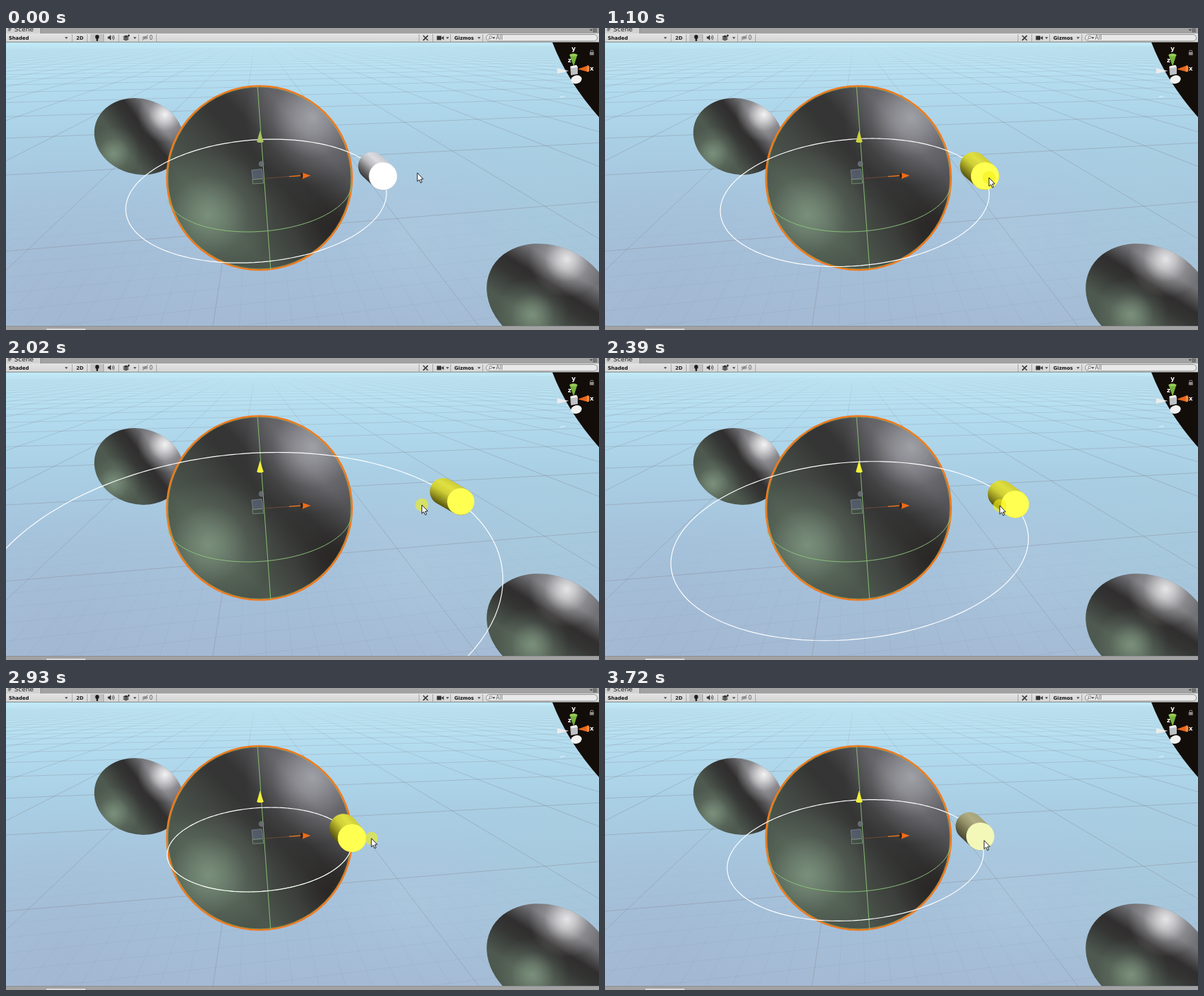
Write an HTML page with a canvas that moves like this. It is 865x440 px and loops after 4.29 s.

```html
<!DOCTYPE html>
<html lang="en">
<head>
<meta charset="utf-8">
<title>Scene view radius handle</title>
<style>
html, body { margin: 0; width: 865px; height: 440px; overflow: hidden; background: #a2a2a2; }
canvas { display: block; }
</style>
</head>
<body>
<canvas id="stage" width="865" height="440"></canvas>
<script>
const W = 865, H = 440, LOOP = 4290, TAU = Math.PI * 2;
const stage = document.getElementById('stage').getContext('2d');
const backdrop = makeLayer(), overlay = makeLayer();
let g = stage;

function makeLayer() {
  const c = document.createElement('canvas');
  c.width = W;
  c.height = H;
  return c.getContext('2d');
}

// Perspective of the ground plane; one unit is the big sphere's radius.
const YAW = 0.14, COS = Math.cos(YAW), SIN = Math.sin(YAW);
const depth = z => 1 + 0.2703 * z;
const project = (x, z) => [432 + (128.4 * x - 58) / depth(z), 8 + 210.9 / depth(z)];
const rotate = (a, b) => [a * COS - b * SIN, a * SIN + b * COS];

function path(points, close) {
  g.beginPath();
  points.forEach(p => g.lineTo(p[0], p[1]));
  if (close) g.closePath();
}
function poly(points, fill, line, width = 1) {
  path(points, true);
  if (fill) { g.fillStyle = fill; g.fill(); }
  if (line) { g.strokeStyle = line; g.lineWidth = width; g.stroke(); }
}
function stroke(points, color, width = 1) {
  path(points);
  g.strokeStyle = color;
  g.lineWidth = width;
  g.stroke();
}
function box(x, y, w, h, color) {
  g.fillStyle = color;
  g.fillRect(x, y, w, h);
}
function oval(x, y, rx, ry, fill, angle = 0) {
  g.beginPath();
  g.ellipse(x, y, rx, ry, angle, 0, TAU);
  g.fillStyle = fill;
  g.fill();
}
function text(s, x, y, font, color) {
  g.font = font;
  g.fillStyle = color;
  g.fillText(s, x, y);
}
function linear(x0, y0, x1, y1, stops) {
  const gr = g.createLinearGradient(x0, y0, x1, y1);
  stops.forEach(([at, c]) => gr.addColorStop(at, c));
  return gr;
}
function glow(x, y, r, rgb, alpha) {
  const gr = g.createRadialGradient(x, y, 0, x, y, r);
  [[0, 1], [0.25, 0.72], [0.6, 0.22], [1, 0]].forEach(([at, k]) =>
    gr.addColorStop(at, `rgba(${rgb},${alpha * k})`));
  box(x - r, y - r, 2 * r, 2 * r, gr);
}

function arc(r, from, to) {
  const pts = [], n = 160;
  for (let i = 0; i <= n; i++) {
    const a = from + (to - from) * i / n;
    pts.push(project(r * Math.cos(a), r * Math.sin(a)));
  }
  return pts;
}

function gridLine(at, alongX, color) {
  const pts = [];
  for (let s = -45; s <= 45; s += 0.25) {
    const [x, z] = alongX ? rotate(s, at) : rotate(at, s);
    if (depth(z) > 0.3) pts.push(project(x, z));
  }
  if (pts.length > 1) stroke(pts, color, 1);
}

function drawGrid() {
  const step = 1.48;
  const major = linear(0, 21, 0, 434, [
    [0, 'rgba(120,125,140,0)'], [0.12, 'rgba(120,125,140,.2)'],
    [0.35, 'rgba(128,124,132,.36)'], [1, 'rgba(130,124,130,.34)']]);
  const minor = linear(0, 21, 0, 434, [
    [0, 'rgba(100,115,140,0)'], [0.45, 'rgba(100,115,140,0)'], [1, 'rgba(100,115,140,.11)']]);
  for (let i = -24; i <= 24; i++) {
    gridLine(1.17 + i * step, false, major);
    gridLine(-0.978 + i * step, true, major);
  }
  for (let i = -40; i <= 40; i++) {
    if (i % 10 === 0) continue;
    gridLine(1.17 + i * step / 10, false, minor);
    gridLine(-0.978 + i * step / 10, true, minor);
  }
}

function drawSky() {
  box(0, 21, W, 413, linear(0, 21, 0, 434, [
    [0, '#c0e8f5'], [0.15, '#b3dcef'], [0.35, '#a9cfe5'], [0.6, '#a6c3dc'], [1, '#a4bad4']]));
  glow(800, 270, 260, '168,208,222', 0.5);
  glow(590, 300, 170, '178,206,226', 0.35);
  glow(90, 400, 220, '160,180,208', 0.4);
}

// Ball lit white from the upper right and green from the lower left.
function ball(x, y, rx, ry, angle, white, green, stops, shine) {
  g.save();
  g.beginPath();
  g.ellipse(x, y, rx, ry, angle, 0, TAU);
  g.clip();
  const dx = white[0] - green[0], dy = white[1] - green[1];
  const len = Math.hypot(dx, dy), ux = dx / len * ry, uy = dy / len * ry;
  box(x - rx, y - rx, 2 * rx, 2 * rx, linear(x - ux, y - uy, x + ux, y + uy, stops));
  glow(green[0], green[1], ry * 0.72, '146,174,148', 0.66);
  glow(white[0], white[1], ry * 0.74, shine ? '250,250,252' : '205,205,214', shine || 0.62);
  g.restore();
}

function drawWorld() {
  drawSky();
  drawGrid();
  g.beginPath();
  g.moveTo(797, 21);
  g.quadraticCurveTo(819, 78, 865, 130);
  g.lineTo(865, 21);
  g.fillStyle = '#130d09';
  g.fill();

  const small = [[0, '#4c574d'], [0.25, '#4e594f'], [0.5, '#343534'],
    [0.62, '#302e2e'], [0.82, '#727276'], [1, '#6c6c72']];
  ball(194, 158, 66, 55, 0.28, [232, 126], [157, 183], small, 0.95);
  ball(793, 393, 95, 75, 0.43, [818, 337], [768, 417], small, 0.85);
  ball(370, 218.5, 135, 134, 0, [447, 130], [295, 273], [
    [0, '#465047'], [0.2, '#4c574d'], [0.42, '#414541'], [0.56, '#343534'],
    [0.66, '#353535'], [0.85, '#57575b'], [1, '#545459']]);
  g.save();
  g.beginPath();
  g.arc(370, 218.5, 134, 0, TAU);
  g.clip();
  glow(490, 300, 110, '32,26,24', 0.6);
  g.restore();

  g.lineWidth = 2.6;
  g.strokeStyle = '#f07a1e';
  g.beginPath();
  g.ellipse(369.7, 218.5, 135, 134, 0, 0, TAU);
  g.stroke();
  g.lineWidth = 0.8;
  g.strokeStyle = 'rgba(160,190,90,.6)';
  g.beginPath();
  g.ellipse(369.7, 218.5, 133.4, 132.4, 0, 0, TAU);
  g.stroke();
  stroke(arc(1, -2.646, -0.19), '#8cc47c');
  stroke([[367, 86], [376.5, 219], [386, 352]], '#86c070');
}

function triangle(x, y) {
  poly([[x - 2.2, y - 1.2], [x + 2.2, y - 1.2], [x, y + 1.6]], '#444');
}

function drawBars() {
  const bold = 'bold 7px "DejaVu Sans", sans-serif';
  box(0, 0, W, 8, '#a2a2a2');
  box(0, 0, 50, 8, '#d2d2d2');
  stroke([[50.5, 0], [50.5, 8]], '#8a8a8a');
  text('#', 2, 5, '8px "DejaVu Sans", sans-serif', '#444');
  text('Scene', 12, 5, '9.3px "DejaVu Sans", sans-serif', '#222');
  triangle(853.5, 3);
  for (const y of [1, 3, 5]) box(856, y, 6, 1, '#444');

  box(0, 8, W, 13, linear(0, 8, 0, 21, [[0, '#e4e4e4'], [1, '#d3d3d3']]));
  box(0, 20, W, 1, '#8c8c8c');
  for (const x of [96, 118, 142, 164, 193, 219, 602, 622, 648, 695]) box(x, 9, 1, 11, '#a6a6a6');
  box(123, 9, 19, 11, '#c4c4c4');
  text('Shaded', 4, 17, bold, '#111');
  text('2D', 102.5, 17, bold, '#222');
  text('Gizmos', 654, 17, bold, '#111');
  [88, 188, 644, 690].forEach(x => triangle(x, 14.5));

  oval(133, 13, 2.8, 3, '#1c1c1c');
  box(131.8, 15, 2.4, 4, '#1c1c1c');
  poly([[148.5, 12.5], [150.5, 12.5], [153, 10], [153, 18], [150.5, 15.5], [148.5, 15.5]], '#333');
  for (const r of [3, 5.2]) {
    g.beginPath();
    g.arc(152.5, 14, r, -0.8, 0.8);
    g.strokeStyle = '#444';
    g.stroke();
  }
  for (const y of [16.5, 14.5, 12.5])
    poly([[170, y], [175, y - 2.2], [180, y], [175, y + 2.2]], '#333', '#ddd', 0.5);
  oval(179, 11, 1.4, 1.4, '#333');
  oval(203, 14, 4, 2.3, '#9a9a9a');
  stroke([[199, 18], [207, 10]], '#777');
  text('0', 209, 17, '8px "DejaVu Sans", sans-serif', '#555');

  stroke([[608.5, 18], [615.5, 11]], '#222', 1.7);
  stroke([[608.5, 11], [615.5, 18]], '#444', 1.7);
  box(628.5, 11.5, 6.5, 6, '#333');
  poly([[635, 14.5], [638.5, 11.5], [638.5, 17.5]], '#333');

  g.beginPath();
  g.roundRect(700.5, 9.5, 162, 9.5, 5);
  g.fillStyle = '#e9e9e9';
  g.fill();
  g.strokeStyle = '#8d8d8d';
  g.lineWidth = 1;
  g.stroke();
  g.beginPath();
  g.arc(707, 13.5, 2, 0, TAU);
  g.stroke();
  stroke([[705.5, 15], [703.8, 17]], '#666');
  triangle(711.5, 14.5);
  text('All', 714.5, 17, '8px "DejaVu Sans", sans-serif', '#666');

  box(0, 434, W, 6, '#a2a2a2');
  box(0, 434, W, 1, '#8b8f94');
  box(59, 438, 57, 2, '#dadada');
}

function drawCompass() {
  const bold = 'bold 9px "DejaVu Sans", sans-serif';
  poly([[804, 58.5], [804, 66.5], [821, 62.5]], '#ececec');
  poly([[822, 39], [833.5, 39], [828, 56]], '#77b33c');
  oval(827.8, 39.3, 5.8, 2, '#96cc58');
  poly([[849, 54.5], [849, 64], [834, 60]], '#e8661c');
  oval(849, 59.3, 2, 4.8, '#f58a3c');
  poly([[823, 56], [832, 54], [834, 57], [834, 67], [824, 69]], '#bfc2c5');
  poly([[823, 56], [832, 54], [834, 57], [825, 58.5]], '#f2f2f2');
  oval(832, 75, 8, 6, '#f1f1f1', -0.25);
  text('y', 825, 33, bold, '#fff');
  text('x', 851.5, 62, bold, '#fff');
  text('z', 819.5, 50, bold, '#fff');
  box(851.5, 35, 6, 4.5, '#8a8a8a');
  g.beginPath();
  g.arc(854.5, 34.5, 2, Math.PI, TAU);
  g.strokeStyle = '#8a8a8a';
  g.lineWidth = 1.2;
  g.stroke();
  stroke([[808, 100.5], [815, 99.5]], 'rgba(255,255,255,.7)');
}

function drawMover(tip) {
  poly([[358.5, 207], [373, 205.5], [375, 219.5], [360, 221]], 'rgba(100,112,135,.6)', '#7d8792', 0.8);
  poly([[359.5, 220.5], [374.5, 219.5], [376, 226], [360, 227]], 'rgba(75,95,80,.4)', '#7f967c', 0.8);
  oval(372.5, 198, 4, 4.3, 'rgba(112,116,122,.85)');
  stroke([[376, 219.3], [413, 216.4]], 'rgba(150,85,60,.6)');
  stroke([[413, 216.4], [431, 215]], '#f07a1e', 1.3);
  poly([[430, 210], [444.5, 215], [432, 220]], '#ef6c1a');
  oval(431.3, 215, 1.8, 4.8, '#34211a');
  poly([[370.5, 149.5], [366, 165.5], [375.5, 165.5]], tip);
  oval(370.8, 165.2, 4.8, 1.8, tip);
}

// Body shades run from the dark lower left to the light upper right.
const IDLE = { face: '#ffffff', body: ['#343434', '#707072', '#b9b9bd', '#dcdce1', '#c9c9cf'] };
const HOVER = { face: '#f3f8b8', body: ['#45432f', '#6f6d4b', '#96936b', '#b0ad85', '#a5a278'] };
const HELD = { face: '#ffff52', body: ['#55520f', '#96941f', '#cfce36', '#e0e042', '#cccb35'] };

function drawHandle(r, look) {
  const [px, pz] = rotate(r, 0), [x, y] = project(px, pz);
  const size = 21.6 / depth(pz), dx = 8 + (r - 1.365) * 5, dy = 7.4;
  const len = Math.hypot(dx, dy), nx = dy / len * size, ny = -dx / len * size;
  g.lineCap = 'round';
  stroke([[x - dx, y - dy], [x + dx, y + dy]],
    linear(x - nx, y - ny, x + nx, y + ny, look.body.map((c, i) => [i / 4, c])), size * 2 - 0.6);
  g.lineCap = 'butt';
  oval(x + dx, y + dy, size, size * 0.98, look.face);
}

function drawCursor(x, y) {
  const shape = [[0, 0], [0, 12.5], [2.8, 10], [4.8, 14.6], [6.8, 13.7], [4.9, 9.3], [8.5, 9]];
  poly(shape.map(p => [x + p[0], y + p[1]]), '#fff', '#1a1a1a', 1);
}

// time, value...
const RADIUS = [[1000, 1.365], [1100, 1.4], [1500, 1.9], [1530, 1.9], [1580, 2.04], [1700, 2.35],
  [2005, 2.35], [2390, 1.77], [2520, 1.4], [2550, 1.4], [2800, 1.09], [2930, 1], [3080, 1], [3510, 1.345]];
const POINTER = [[240, 600, 211], [680, 558, 217], [1000, 558, 217], [1100, 560, 218], [1500, 589, 215],
  [1580, 595, 214], [1700, 608, 213], [2005, 608, 214], [2390, 576, 215], [2520, 558, 217],
  [2930, 533, 219], [3080, 533, 219], [3510, 553, 222]];

function track(keys, t) {
  const i = keys.findIndex(k => k[0] > t);
  if (i === 0) return keys[0].slice(1);
  if (i < 0) return keys[keys.length - 1].slice(1);
  const a = keys[i - 1], b = keys[i], k = (t - a[0]) / (b[0] - a[0]);
  return a.slice(1).map((v, j) => v + (b[j + 1] - v) * k);
}

function draw(t) {
  g = stage;
  const [r] = track(RADIUS, t), [cx, cy] = track(POINTER, t);
  const held = t >= 830 && t < 3720;
  const look = held ? HELD : t >= 550 ? HOVER : IDLE;
  g.drawImage(backdrop.canvas, 0, 0);
  stroke(arc(r, 0, TAU), '#fff', 1.2);
  drawMover(t < 1000 ? '#a9c262' : t < 1400 ? '#cdd242' : '#f0f03a');
  drawHandle(r, look);
  if (held) oval(cx, cy, 9.5, 9.5, 'rgba(244,240,20,.6)');
  drawCursor(cx, cy);
  g.drawImage(overlay.canvas, 0, 0);
}

g = backdrop;
drawWorld();
g = overlay;
drawCompass();
drawBars();

const start = performance.now();
function tick() {
  draw((performance.now() - start) % LOOP);
  requestAnimationFrame(tick);
}
tick();
</script>
</body>
</html>
```
